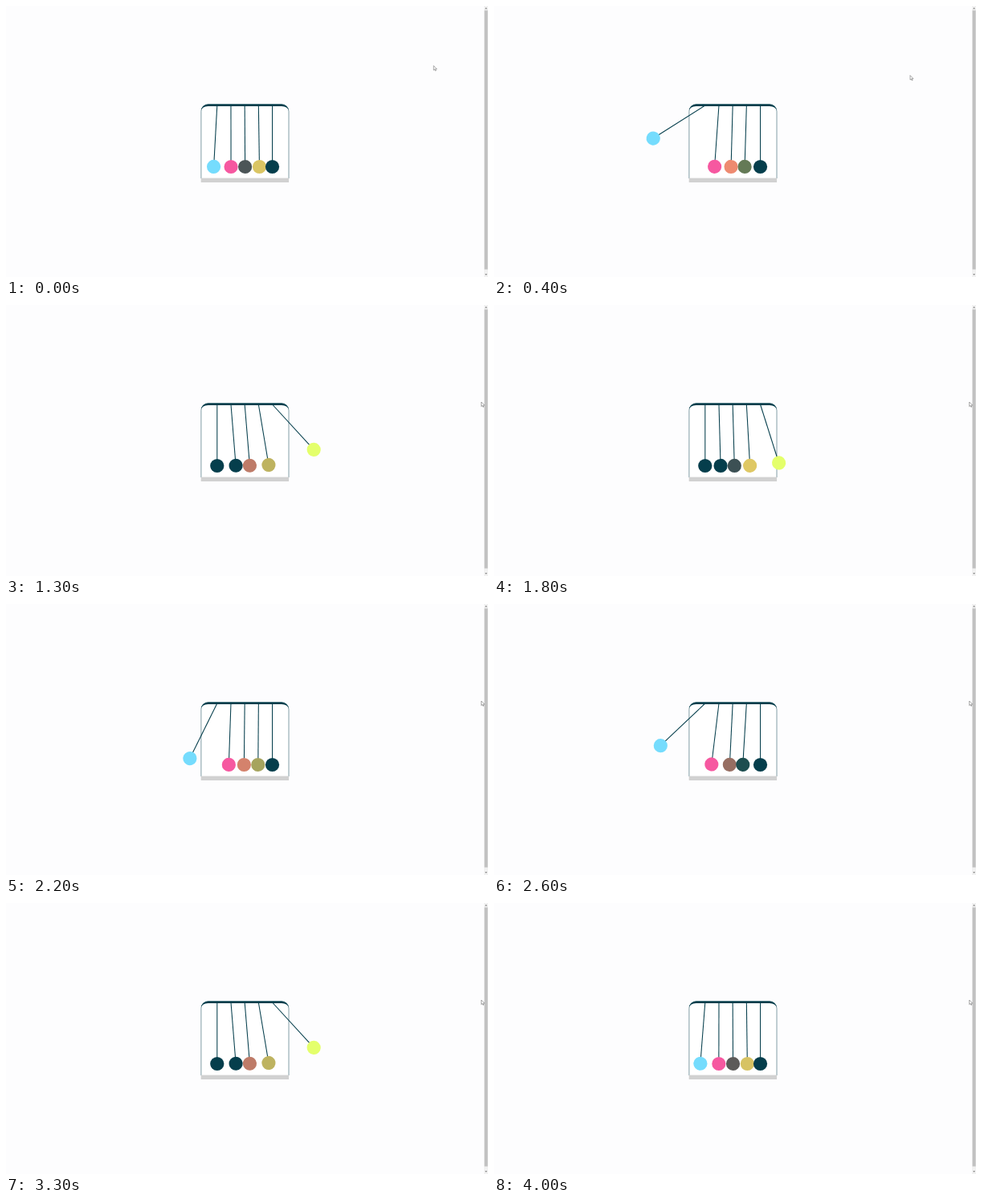
An HTML page that plays this animation: 600 by 338 pixels, repeating every 4.1 s.

```html
<!DOCTYPE html>
<html lang="en">
<head>
<meta charset="utf-8">
<title>Swinging balls</title>
<style>
  html, body { margin: 0; width: 100%; height: 100%; overflow: hidden; background: #fdfdfe; }
  svg { display: block; }
</style>
</head>
<body>
<svg width="600" height="338" viewBox="0 0 600 338">
  <rect x="595" width="5" height="338" fill="#f1f1f1"/>
  <rect id="thumb" x="595.6" y="5.5" width="4" height="323"/>
  <path d="M596.3 3.6h2.6l-1.3-1.6zM596.3 334.2h2.6l-1.3 1.6z" fill="#606060"/>
  <path d="M242.9 215V131.5a9 9 0 0 1 9-9H343a9 9 0 0 1 9 9V215" fill="#fff" stroke="#053e4c" stroke-width=".5"/>
  <path d="M242.6 131.5a9 9 0 0 1 9-9.1H343a9 9 0 0 1 9 9.1a9 6.6 0 0 0-9-6.6H251.6a9 6.6 0 0 0-9 6.6z" fill="#053e4c"/>
  <rect x="242.7" y="214.6" width="109.4" height="5.4" fill="#d1d1d1"/>
  <g id="balls"></g>
  <path id="cursor" d="M0 0V5.6L1.3 4.4L2.2 6.4L3.1 6L2.2 4.1H4Z" fill="#fff" stroke="#555" stroke-width=".5"/>
</svg>
<script>
const LOOP = 4100, STEP = 100, HALF = 1000;
const DARK = [5, 62, 76];
const $ = id => document.getElementById(id);

const mix = (a, b, x) => a + (b - a) * x;
const clamp = x => Math.min(1, Math.max(0, x));
const easeIn = (x, power = 1.7) => x ** power;

// Outer ball: out and back within one half of the period. Positive angles lean left.
function outer(p, angle) {
  const x = p / 500;
  if (p < 0 || p >= HALF) return 0;
  return angle * (x < 1 ? easeIn(x) : 1 - easeIn(x - 1));
}

// Inner ball: slow drift left, sharp return, push right, slow return.
function inner(p, left, right) {
  const rest = -0.12 * right;
  if (p < 900) return mix(rest, left, easeIn(p / 900, 1.3));
  if (p < HALF) return mix(left, 0, easeIn((p - 900) / 100));
  if (p < 1400) return -right * easeIn((p - HALF) / 400);
  return mix(-right, rest, easeIn((p - 1400) / 600));
}

const lit = p => +(p > 20 && p < 995);
const pulse = p => p < HALF
  ? Math.sin(Math.PI * clamp(p / 900))
  : 0.82 * Math.sin(Math.PI * (p - HALF) / HALF);
const fade = p => p < HALF
  ? Math.cos(Math.PI / 2 * clamp(p / 900)) ** 2
  : clamp((p - HALF) / 480);

const balls = [
  { color: [117, 220, 253], angle: p => outer(p, 60), tint: lit },
  { color: [246, 88, 160], angle: p => inner(p, 9.6, 4.6), tint: lit },
  { color: [240, 139, 112], angle: p => inner(p, 4.1, 4.7), tint: pulse },
  { color: [223, 200, 100], angle: p => inner(p, 5.1, 9.5), tint: fade },
  { color: [228, 255, 107], angle: p => outer(p - HALF, -60), tint: p => lit(p - HALF) }
];

function add(parent, name, attrs) {
  const el = document.createElementNS(parent.namespaceURI, name);
  for (const k in attrs) el.setAttribute(k, attrs[k]);
  return parent.appendChild(el);
}

balls.forEach((b, i) => {
  b.x = 262.8 + i * 17.18;
  b.group = add($("balls"), "g", {});
  add(b.group, "path", { d: `M${b.x} 124V194`, stroke: "#053e4c", "stroke-width": 1.05 });
  b.disc = add(b.group, "circle", { cx: b.x, cy: 200.5, r: 8.6 });
});

// The pointer glides down, then slightly overshoots onto the scrollbar.
function drawCursor(t) {
  const u = clamp((t - 800) / 400), glide = clamp((t - 200) / 600);
  const dash = 1 - (1 - u) ** 2 * (1 - 2.2 * u) - (u ? 0 : 0);
  const x = mix(mix(532.3, 489.5, glide), 591.7, dash);
  const y = mix(mix(74.5, 110.6, glide), 121, dash);
  $("cursor").setAttribute("transform", `translate(${x} ${y})`);
  $("thumb").setAttribute("fill", x > 595 ? "#a8a8a8" : "#c1c1c1");
}

function draw(t) {
  const lag = t < HALF ? 88 : 108;
  const p = (t + lag) % (2 * HALF);
  for (const b of balls) {
    const share = b.tint(p);
    const rgb = DARK.map((d, k) => Math.round(mix(d, b.color[k], share)));
    b.disc.setAttribute("fill", `rgb(${rgb})`);
    b.group.setAttribute("transform", `rotate(${b.angle(p)} ${b.x} 124)`);
  }
  drawCursor(t);
}

const start = performance.now();
function tick() {
  const t = (performance.now() - start) % LOOP;
  draw(Math.floor(t / STEP) * STEP);
  requestAnimationFrame(tick);
}
tick();
</script>
</body>
</html>
```
